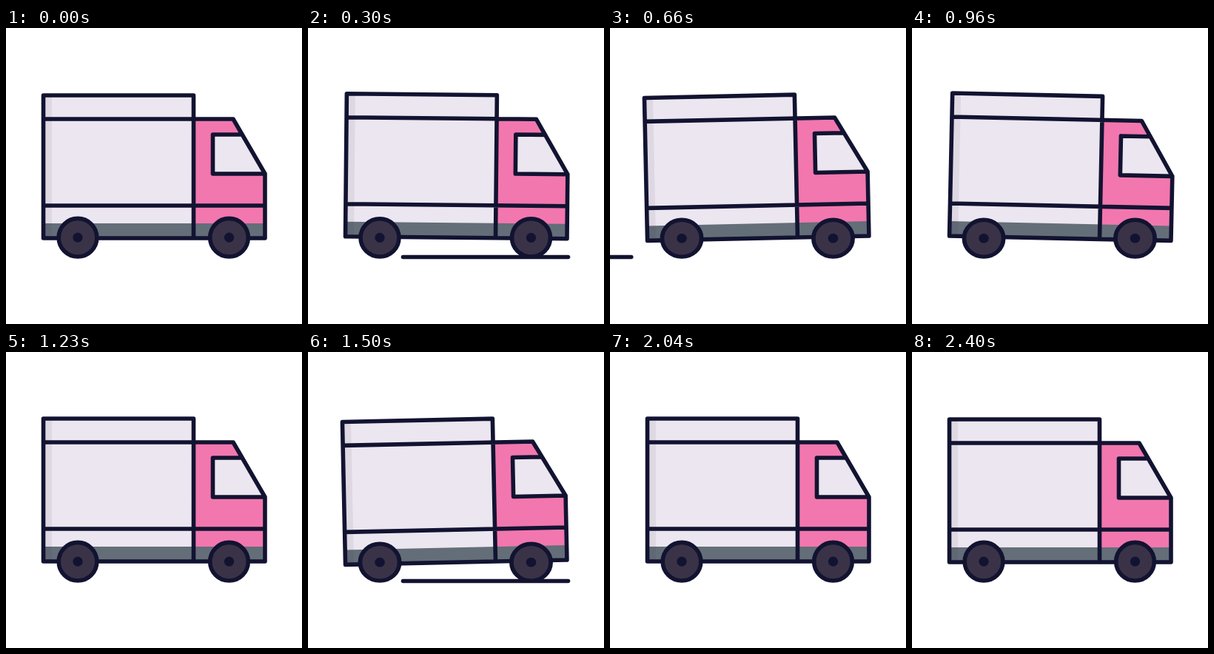
Write an HTML page that moves like this. It is 400 px wide and 400 px high and loops after 2490 ms.

```html
<!DOCTYPE html>
<html lang="en">
<head>
<meta charset="utf-8">
<title>Delivery truck</title>
<style>
  html, body { margin: 0; width: 100%; height: 100%; overflow: hidden; background: #fff; }
  svg { display: block; width: 100vw; height: 100vh; }
  .ink { fill: none; stroke: #121331; stroke-width: 5.6; stroke-linecap: round; stroke-linejoin: round; }
  .tire { fill: #3a3347; stroke: #121331; stroke-width: 5.6; }
  .hub { fill: #121331; }
</style>
</head>
<body>
<svg viewBox="0 0 400 400">
  <g id="truck">
    <path fill="#ebe6ef" d="M50.5 91H253.5V284H50.5Z"/>
    <path fill="#f277ae" d="M253.5 123H307L350 197V284H253.5Z"/>
    <path fill="#ebe6ef" d="M279.5 144H319.2L350 197H279.5Z"/>
    <path fill="#646e78" d="M50.5 264H350V284H50.5Z"/>
    <path fill="#3a1f4c" opacity=".07" d="M50.5 91H62V284H50.5Z"/>
    <path class="ink" d="M50.5 91H253.5V284H50.5ZM50.5 123H307L350 197V284H253.5M50.5 240H350M319.2 144H279.5V197H350"/>
  </g>
  <path id="road" class="ink"/>
  <g class="wheel"><circle class="tire" cx="97" cy="283.2" r="25.8"/><circle class="hub" cx="97" cy="283.2" r="6.6"/></g>
  <g class="wheel"><circle class="tire" cx="301.5" cy="283.2" r="25.8"/><circle class="hub" cx="301.5" cy="283.2" r="6.6"/></g>
</svg>
<script>
  const LOOP = 2490, STEP = 30, LAST = 80, PASS = 40;
  const truck = document.getElementById('truck');
  const road = document.getElementById('road');
  const wheels = [...document.querySelectorAll('.wheel')];

  // step, half swings completed
  const swings = [[0, 0], [10, 3.15], [22, 6.5], [32, 9.5], [50, 14.5], [68, 19], [74, 20.5], [80, 21]];

  function swingAt(k) {
    const i = Math.max(1, swings.findIndex(p => p[0] >= k));
    const [a, u] = swings[i - 1], [b, v] = swings[i];
    return u + (v - u) * (k - a) / (b - a);
  }

  function draw(k) {
    const tilt = -Math.sin(Math.PI * swingAt(k));
    const load = tilt * tilt;
    const fade = Math.min(1, k / 3, (LAST - k) / 6);
    const lift = fade * (load * 1.2 - 1);
    truck.setAttribute('transform', `translate(0 ${lift}) rotate(${tilt * 1.22} 200 284)`);

    const sx = 1 + 0.03 * load, sy = 1 - 0.035 * load;
    wheels.forEach((w, i) => {
      const x = i ? 301.5 : 97;
      w.setAttribute('transform', `translate(${x} 311.8) scale(${sx} ${sy}) translate(${-x} -311.8)`);
    });

    // the road mark sweeps by twice
    const n = k % PASS;
    const left = 436 - 30.75 * n, right = 620.5 - 26.9 * n;
    road.setAttribute('d', n > 0 && right > -4 ? `M${left} 309.5H${right}` : '');
  }

  function tick() {
    draw(Math.min(LAST, Math.floor(performance.now() % LOOP / STEP)));
    requestAnimationFrame(tick);
  }
  tick();
</script>
</body>
</html>
```
